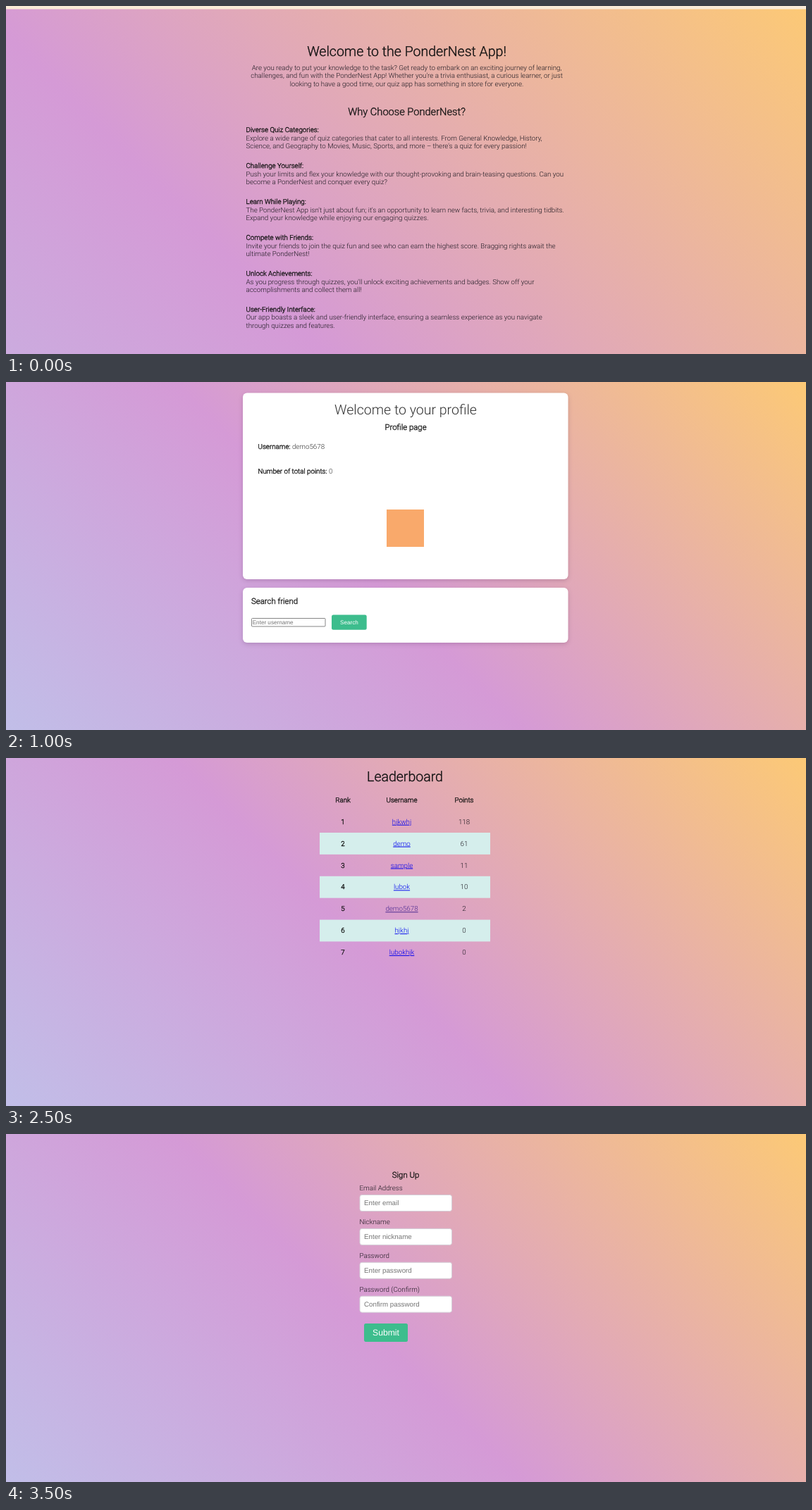
An HTML page that plays this animation: 1135x494 px, repeating every 4 s.

```html
<!DOCTYPE html>
<html lang="en">
<head>
<meta charset="utf-8">
<title>Quiz app tour</title>
<style>
  html, body { margin: 0; width: 100%; height: 100%; overflow: hidden; }
  svg { display: block; width: 1135px; height: 494px; }
  text { font: 300 9.76px Roboto, sans-serif; fill: #1c1820; text-rendering: geometricPrecision; }
  .mid { text-anchor: middle; }
  .bold { stroke: #111; stroke-width: .35px; fill: #111; }
  .h1 { font-size: 19.52px; }
  .h2 { font-size: 14.64px; }
  .h3 { font-size: 11.42px; }
  .choice { font-size: 12.2px; }
  .nav { font-size: 10.75px; stroke: #222; stroke-width: .15px; }
  .hint { font: 9.76px "Liberation Sans", Arial, sans-serif; fill: #757575; }
  .button { font: 12.2px "Liberation Sans", Arial, sans-serif; fill: #fff; }
  .small { font-size: 8.13px; }
  .pale { fill: #f5e8f1; }
  .dim { fill: #333; }
  .link { fill: #00e; text-decoration: underline; }
  .visited { fill: #4b2a90; }
  .card { fill: #fff; filter: drop-shadow(0 2px 3px rgba(60, 20, 60, .2)); }
  .icon { fill: none; stroke: #414850; stroke-width: 1.4; stroke-linejoin: round; stroke-linecap: round; }
</style>
</head>
<body>
<svg id="stage" viewBox="0 0 1135 494"></svg>
<script>
const W = 1135, STEP = 500, LINE = 11.7;

const text = (x, y, str, cls = '') => `<text x="${x}" y="${y}" class="${cls}">${str}</text>`;
const rect = (x, y, w, h, r, attrs) =>
  `<rect x="${x}" y="${y}" width="${w}" height="${h}" rx="${r}" ${attrs}/>`;
const button = (x, y, w, h, label, baseline, cls = '') =>
  rect(x, y, w, h, 2.5, 'fill="#3dbd8d"') + text(x + w / 2, baseline, label, 'button mid ' + cls);

// A diagonal gradient as on a page of the given height, seen scrolled to its top.
const gradient = (id, h) => {
  const d = (W + h) / 2;
  return `<linearGradient id="${id}" gradientUnits="userSpaceOnUse" x1="0" y1="${h}" x2="${d}" y2="${h - d}">
    <stop offset="0" stop-color="#c1bee8"/><stop offset=".45" stop-color="#d59ad6"/>
    <stop offset="1" stop-color="#fcc976"/></linearGradient>`;
};
const backdrop = id => rect(0, 0, W, 494, 0, `fill="url(#${id})"`);

const intro = [
  'Are you ready to put your knowledge to the task? Get ready to embark on an exciting journey of learning,',
  'challenges, and fun with the PonderNest App! Whether you\'re a trivia enthusiast, a curious learner, or just',
  'looking to have a good time, our quiz app has something in store for everyone.'
];
const features = [
  ['Diverse Quiz Categories:',
   'Explore a wide range of quiz categories that cater to all interests. From General Knowledge, History,',
   'Science, and Geography to Movies, Music, Sports, and more – there\'s a quiz for every passion!'],
  ['Challenge Yourself:',
   'Push your limits and flex your knowledge with our thought-provoking and brain-teasing questions. Can you',
   'become a PonderNest and conquer every quiz?'],
  ['Learn While Playing:',
   'The PonderNest App isn\'t just about fun; it\'s an opportunity to learn new facts, trivia, and interesting tidbits.',
   'Expand your knowledge while enjoying our engaging quizzes.'],
  ['Compete with Friends:',
   'Invite your friends to join the quiz fun and see who can earn the highest score. Bragging rights await the',
   'ultimate PonderNest!'],
  ['Unlock Achievements:',
   'As you progress through quizzes, you\'ll unlock exciting achievements and badges. Show off your',
   'accomplishments and collect them all!'],
  ['User-Friendly Interface:',
   'Our app boasts a sleek and user-friendly interface, ensuring a seamless experience as you navigate',
   'through quizzes and features.']
];
const players = [
  ['hjkwhj', 118], ['demo', 61], ['sample', 11], ['lubok', 10],
  ['demo5678', 2], ['hjkhj', 0], ['lubokhjk', 0]
];

const home = () => backdrop('tall') + rect(0, 0, W, 4.5, 0, 'fill="#faebd7"') +
  text(568.5, 70.5, 'Welcome to the PonderNest App!', 'h1 bold mid') +
  intro.map((s, i) => text(568.5, 90.7 + i * LINE, s, 'mid')).join('') +
  text(568.5, 155, 'Why Choose PonderNest?', 'h2 bold mid') +
  features.map((lines, k) => lines.map((s, i) =>
    text(340.5, 179 + k * 50.95 + i * LINE, s, i ? '' : 'bold')).join('')).join('');

const house = `<g class="icon">
  <path d="M28 4 39.5 14 37.5 16 28 7.8 18.5 16 16.5 14Z"/>
  <path d="M20 15.5V25.2H25.4V19.5a2.6 2.6 0 0 1 5.2 0V25.2H36V15.5M33.3 8.3V5.2H36.4V11"/>
  <circle cx="28" cy="12.8" r="1.7"/></g>`;

const field = (x, y, label, hint) => text(x, y, label) +
  rect(x + .5, y + 6.3, 130.5, 23, 3, 'fill="#fff" stroke="#d5cfd8"') +
  text(x + 6.5, y + 21, hint, 'hint');

const login = () => backdrop('medium') + rect(0, 0, W, 8, 0, 'fill="#4c4a4c"') +
  rect(0, 1, W, 33.7, 3, 'fill="#faebd7"') + rect(0, 20, W, 14.7, 0, 'fill="#faebd7"') + house +
  text(1032, 19.5, 'LOGIN', 'nav') + text(1077, 19.5, 'SIGN UP', 'nav') +
  text(566, 108.7, 'Login', 'h3 bold mid') +
  field(500.5, 127, 'Email Address', 'Enter email') +
  field(500.5, 175, 'Password', 'Enter password') +
  button(507, 220, 53, 26, 'Login', 237.3) +
  text(566, 284.5, 'Create new account', 'mid pale');

const profileCard = () => backdrop('short') + rect(336, 15.5, 461.5, 264.5, 6, 'class="card"') +
  text(567, 46.3, 'Welcome to your profile', 'h1 mid dim') +
  text(567, 68, 'Profile page', 'h3 bold mid') +
  text(357.5, 95.3, '<tspan class="bold">Username:</tspan> demo5678', 'dim') +
  text(357.5, 130.2, '<tspan class="bold">Number of total points:</tspan> 0', 'dim') +
  rect(540, 181, 53, 53, 0, 'fill="#f9a96b"');

const profile = () => profileCard() + rect(336, 292, 461.5, 78, 6, 'class="card"') +
  text(348, 315.3, 'Search friend', 'h3 bold') +
  rect(348.5, 335.5, 104.5, 11.5, 1, 'fill="#fff" stroke="#858585"') +
  text(349.7, 344, 'Enter username', 'hint small') +
  button(462, 330.5, 49.7, 21.3, 'Search', 344, 'small');

const quiz = () => backdrop('short') + [1, 2, 3, 4].map((n, i) => {
  const y = 6.5 + i * 52.75;
  return rect(491.5, y, 149, 28, 3, 'fill="none" stroke="#cdc8d0"') +
    text(566, y + 18.2, `Choice ${n} for Question 4`, 'choice mid');
}).join('') + button(535, 217, 62, 26, 'Submit', 234.2);

const blank = () => backdrop('short');

const leaderboard = () => backdrop('short') +
  text(566, 33.3, 'Leaderboard', 'h1 bold mid') +
  text(478, 63, 'Rank', 'bold mid') + text(561.5, 63, 'Username', 'bold mid') +
  text(650, 63, 'Points', 'bold mid') +
  players.map(([name, points], i) => {
    const y = 93.7 + i * 30.9;
    return (i % 2 ? rect(445, y - 18.6, 242, 30.9, 0, 'fill="#d5eeec"') : '') +
      text(478, y, i + 1, 'bold mid') +
      text(561.5, y, name, 'link mid' + (i === 4 ? ' visited' : '')) +
      text(650, y, points, 'mid');
  }).join('');

const signUp = () => backdrop('short') + text(567, 62, 'Sign Up', 'h3 bold mid') +
  [['Email Address', 'Enter email'], ['Nickname', 'Enter nickname'],
   ['Password', 'Enter password'], ['Password (Confirm)', 'Confirm password']]
    .map(([label, hint], i) => field(501.5, 80.2 + i * 47.9, label, hint)).join('') +
  button(508, 269, 62, 26, 'Submit', 286.2);

const scenes = [home, login, profile, quiz, blank, leaderboard, profileCard, signUp];
const stage = document.getElementById('stage');
stage.innerHTML = `<defs>${gradient('tall', 1000)}${gradient('medium', 550)}${gradient('short', 494)}</defs>` +
  scenes.map(draw => `<g class="scene" visibility="hidden">${draw()}</g>`).join('');
const groups = [...stage.querySelectorAll('.scene')];

const start = performance.now();
let shown = -1;
function tick(now) {
  const current = Math.floor(Math.max(0, now - start) / STEP) % groups.length;
  if (current !== shown) {
    groups.forEach((g, i) => g.setAttribute('visibility', i === current ? 'visible' : 'hidden'));
    shown = current;
  }
  requestAnimationFrame(tick);
}
tick(start);
</script>
</body>
</html>
```
